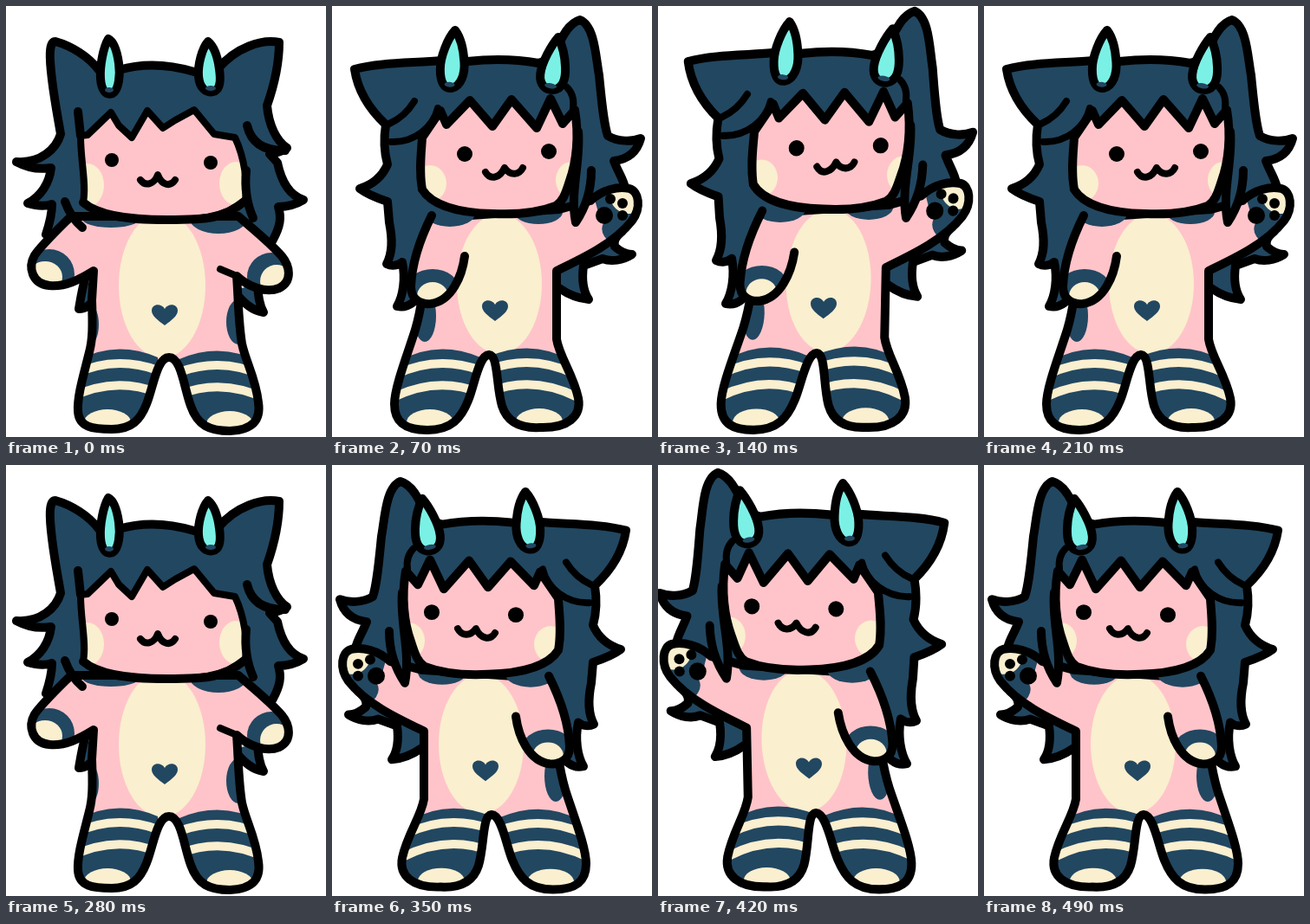
Animation of 369x498 px, one loop 0.56 s. Source, as an HTML page:

```html
<!DOCTYPE html>
<html lang="en">
<head>
<meta charset="utf-8">
<title>Waving plush</title>
<style>
  html, body { margin: 0; width: 100%; height: 100%; overflow: hidden; background: #fff; }
  svg { display: block; width: 100vw; height: 100vh; }
  .hair { fill: #224761; }
  .skin { fill: #ffc4c9; }
  .cream { fill: #faefcf; }
  .horn { fill: #7bf1e6; }
  .ink { fill: #000; }
  .line { stroke: #000; stroke-width: 10; stroke-linecap: round; stroke-linejoin: round; }
  .open { fill: none; }
  .thin { stroke-width: 8; }
  .band { fill: none; stroke: #faefcf; stroke-width: 10; }
</style>
</head>
<body>
<svg viewBox="0 0 369 498">
  <defs>
    <path id="restBody" d="M75 243C60 258 42 275 33 288C25 302 30 321 50 323C68 325 85 316 101 306
      L99 340C100 370 100 385 96 400C90 425 82 450 83 468C84 487 100 489 122 489
      C145 489 155 478 162 460C170 440 174 406 188 406C202 406 205 440 213 462
      C221 485 235 491 258 491C285 490 294 478 291 458C288 430 276 410 272 390
      C268 365 268 340 266 312C280 325 300 332 315 326C331 318 327 300 318 289C303 272 285 258 268 243Z"/>
    <path id="restFace" d="M86 150L94 149L121 123L130 138L145 152L163 121L181 141L195 132L217 120L240 148L264 152
      C275 175 279 205 276 225C250 246 215 247 185 247C135 247 105 241 89 227C93 205 86 180 86 150Z"/>
    <path id="waveBody" d="M115 245C108 300 106 340 96 374C88 400 72 440 72 460C72 484 88 490 110 490
      C138 490 149 476 157 456C165 436 169 404 181 403C192 404 189 438 196 462
      C203 484 222 488 240 487C272 488 288 474 284 453C278 425 262 405 259 385L259 306
      C288 292 325 275 346 248C357 233 354 214 343 211C330 208 312 212 298 225L262 235Z"/>
    <path id="waveArm" d="M115 242C101 270 92 300 91 324C91 340 103 345 114 344C138 341 150 312 153 289"/>
    <path id="waveFace" d="M104 152L125 121L132 137L159 109L185 139L207 108L236 141L252 107L266 136L280 120
      C285 150 282 180 274 202C269 218 266 226 258 231C235 240 205 241 185 240C145 239 115 230 104 212C100 190 103 170 104 152Z"/>
    <clipPath id="restBodyClip"><use href="#restBody"/></clipPath>
    <clipPath id="restFaceClip"><use href="#restFace"/></clipPath>
    <clipPath id="waveBodyClip"><use href="#waveBody"/></clipPath>
    <clipPath id="waveArmClip"><use href="#waveArm"/></clipPath>
    <clipPath id="waveFaceClip"><use href="#waveFace"/></clipPath>

    <g id="sock">
      <path class="hair" d="M-45 411Q0 385 50 406V496H-60Z"/>
      <path class="band" d="M-48 426Q0 403 50 421M-52 453Q0 427 50 447"/>
      <ellipse class="cream" cx="-8" cy="481" rx="27" ry="15"/>
    </g>
    <path id="heart" class="hair" d="M0 13C-8 7-15 2-15-4C-15-12-4-13 0-6C4-13 15-12 15-4C15 2 8 7 0 13Z"/>
  </defs>

  <g id="rest">
    <path class="hair line" d="M57 41C49 41 50 60 53 85S60 130 63 148C58 165 40 182 12 180C25 187 40 189 52 187
      C50 205 40 220 25 228C35 231 45 232 53 229C53 240 50 252 46 264L90 300H290L308 270
      C316 255 318 245 314 232C325 232 335 229 343 224C328 219 318 205 313 181L304 171
      C312 170 318 168 324 164C312 156 303 138 301 115C308 95 315 70 315 42
      C295 38 265 48 245 72L217 76Q170 62 130 74H107C95 58 75 46 57 41Z"/>
    <path class="hair line" d="M92 312C88 325 86 338 84 350C92 350 97 345 103 338M262 328C275 345 285 352 297 354C292 345 291 335 290 322"/>
    <use href="#restBody" class="skin"/>
    <g clip-path="url(#restBodyClip)">
      <ellipse class="cream" cx="180" cy="323" rx="50" ry="84"/>
      <ellipse class="hair" cx="121" cy="246" rx="33" ry="10"/>
      <ellipse class="hair" cx="245" cy="246" rx="33" ry="17"/>
      <circle class="hair" cx="50" cy="310" r="29"/>
      <ellipse class="cream" cx="45" cy="313" rx="20" ry="18"/>
      <circle class="hair" cx="306" cy="313" r="28"/>
      <circle class="cream" cx="312" cy="318" r="19"/>
      <ellipse class="hair" cx="98" cy="368" rx="9" ry="22"/>
      <ellipse class="hair" cx="268" cy="365" rx="14" ry="26"/>
      <use href="#sock" x="125"/>
      <use href="#sock" transform="translate(250 2) scale(-1 1)"/>
    </g>
    <use href="#heart" x="183" y="356"/>
    <use href="#restBody" class="line open"/>
    <path class="line open thin" d="M266 312L247 304"/>
    <use href="#restFace" class="skin"/>
    <g clip-path="url(#restFaceClip)" class="cream">
      <ellipse cx="94" cy="207" rx="19" ry="25"/>
      <ellipse cx="265" cy="205" rx="19" ry="25"/>
    </g>
    <use href="#restFace" class="line open thin"/>
    <path class="line open" d="M83 122L86 150M89 227C105 241 135 247 185 247S250 246 276 225
      M68 226Q75 245 88 256M278 138Q285 168 322 167M277 190Q274 220 285 245"/>
    <circle class="ink" cx="122" cy="178" r="8"/>
    <circle class="ink" cx="236" cy="181" r="8"/>
    <path class="line open thin" d="M155 201C161 209 171 206 175 195C180 208 190 209 195 201"/>
    <path class="horn line" d="M118 38C112 48 108 70 109 84C110 97 115 104 123 101C130 97 132 80 130 66C128 52 124 41 118 38Z"/>
    <path class="horn line" d="M233 41C226 49 221 68 222 81C223 95 231 101 239 99C247 97 248 87 246 73C244 58 239 46 233 41Z"/>
    <ellipse class="hair" cx="119" cy="97" rx="5" ry="3"/>
    <ellipse class="hair" cx="236" cy="95" rx="6" ry="3"/>
  </g>

  <g id="wave">
    <path class="hair line" d="M26 73C55 65 95 66 126 63L156 64Q200 59 238 66L256 60C262 40 272 20 286 16
      C303 23 304 58 308 80C311 110 313 135 318 150C330 157 346 157 356 153C352 168 342 177 325 179C330 192 336 200 338 210
      L335 260C325 268 325 273 326 278C333 284 340 287 346 287C335 294 322 296 312 292L290 300
      C288 315 290 330 296 339C283 338 272 333 262 326L110 320C98 342 88 350 75 347
      C82 335 85 315 81 296C76 300 69 301 63 298C70 285 70 270 66 250L64 226
      C52 222 40 217 32 211C48 206 58 197 64 183C59 165 60 150 62 137C46 122 30 100 26 73Z"/>
    <use href="#waveBody" class="skin"/>
    <g clip-path="url(#waveBodyClip)">
      <ellipse class="cream" cx="193" cy="321" rx="49" ry="81"/>
      <ellipse class="hair" cx="238" cy="238" rx="28" ry="14"/>
      <ellipse class="hair" cx="107" cy="358" rx="13" ry="30"/>
      <path class="hair" d="M302 218L318 208L350 240L322 275Q307 262 313 251Q306 240 302 218Z"/>
      <ellipse class="cream" cx="339" cy="223" rx="19" ry="16" transform="rotate(35 339 223)"/>
      <use href="#sock" x="121"/>
      <use href="#sock" transform="translate(231 -1) scale(-1 1)"/>
    </g>
    <use href="#heart" x="188" y="351"/>
    <use href="#waveBody" class="line open"/>
    <g class="ink">
      <circle cx="314" cy="242" r="10"/>
      <circle cx="321" cy="223" r="6"/>
      <circle cx="335" cy="228" r="6"/>
      <circle cx="335" cy="242" r="6"/>
    </g>
    <use href="#waveArm" class="skin"/>
    <g clip-path="url(#waveArmClip)">
      <ellipse class="hair" cx="116" cy="328" rx="31" ry="24"/>
      <ellipse class="cream" cx="116" cy="335" rx="18" ry="16"/>
    </g>
    <ellipse class="hair" cx="136" cy="240" rx="29" ry="15"/>
    <use href="#waveArm" class="line open"/>
    <path class="hair line" d="M284 145C287 180 274 215 281 250C289 238 299 218 299 190"/>
    <use href="#waveFace" class="skin"/>
    <g clip-path="url(#waveFaceClip)" class="cream">
      <ellipse cx="113" cy="205" rx="19" ry="21"/>
      <ellipse cx="276" cy="201" rx="18" ry="21"/>
    </g>
    <use href="#waveFace" class="line open"/>
    <path class="line open thin" d="M122 118C117 140 95 158 68 157M95 110Q84 128 66 136M271 94Q280 103 278 118"/>
    <circle class="ink" cx="153" cy="171" r="9"/>
    <circle class="ink" cx="250" cy="168" r="9"/>
    <path class="line open thin" d="M177 192C183 202 194 198 199 187C206 197 216 195 220 187"/>
    <g transform="rotate(4 142 28)">
      <path class="horn line" d="M142 28C134 38 127 60 128 74C129 89 134 97 143 95C153 92 157 78 155 64C153 48 148 35 142 28Z"/>
      <ellipse class="hair" cx="140" cy="91" rx="6" ry="3"/>
    </g>
    <g transform="translate(6 0) rotate(10 255 36)">
      <path class="horn line" d="M255 36C249 46 241 68 242 82C243 94 251 99 260 97C270 94 272 83 269 69C266 54 260 43 255 36Z"/>
      <ellipse class="hair" cx="256" cy="93" rx="7" ry="3"/>
    </g>
  </g>
</svg>
<script>
  const STEP = 70;
  const MIRROR = "matrix(-1 0 0 .995 365 3)";
  const LEAN = "matrix(1 0 -.021 1.021 10.3 -10.4)";
  // One pose per step: null rests, a string waves with that transform.
  const poses = [
    null, "", LEAN, "",
    null, MIRROR, MIRROR + LEAN, MIRROR
  ];
  const rest = document.getElementById("rest");
  const wave = document.getElementById("wave");

  function draw() {
    const pose = poses[Math.floor(performance.now() / STEP) % poses.length];
    const waving = pose !== null;
    rest.style.display = waving ? "none" : "";
    wave.style.display = waving ? "" : "none";
    wave.setAttribute("transform", pose || "");
    requestAnimationFrame(draw);
  }
  draw();
</script>
</body>
</html>
```
